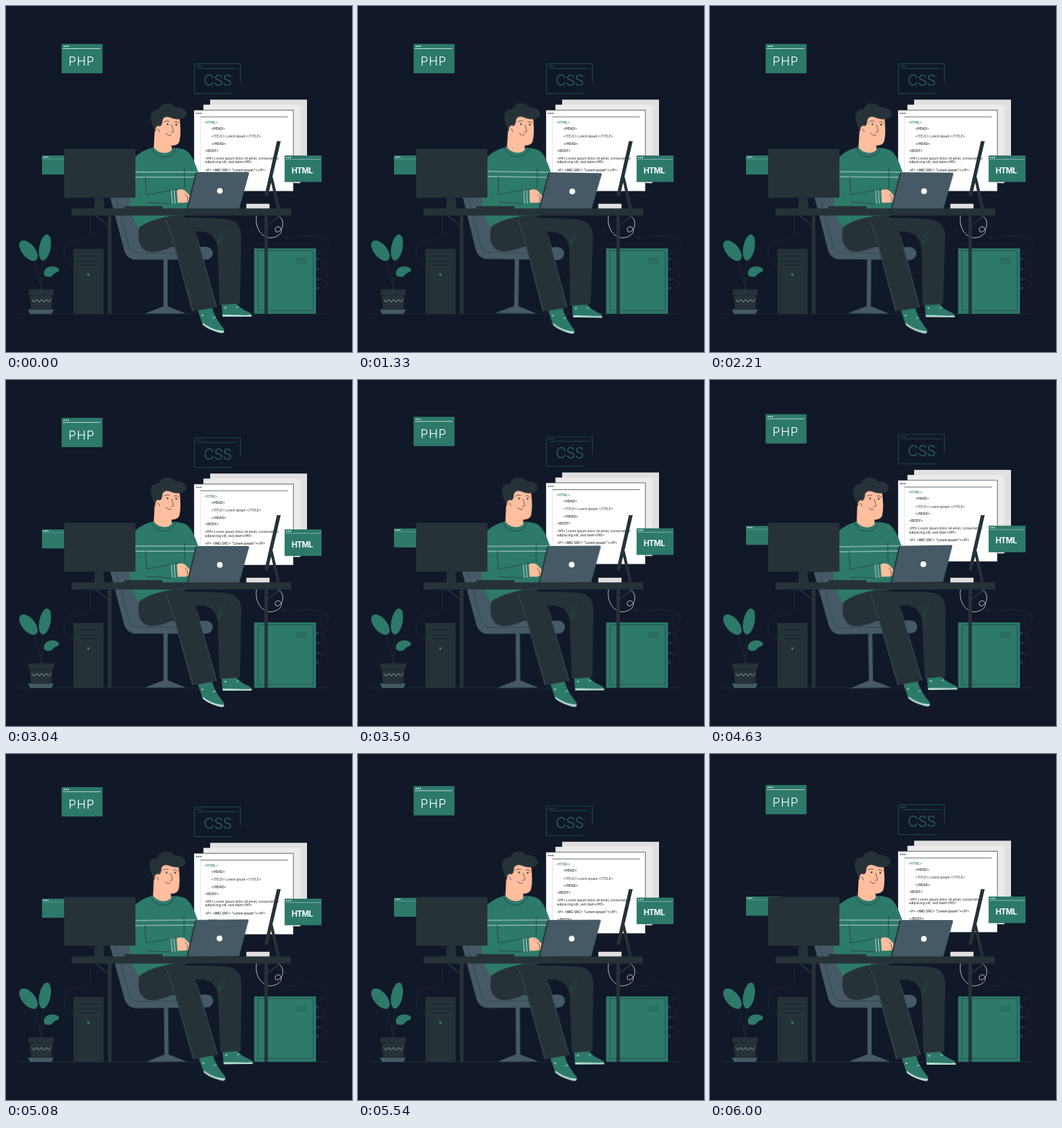
An HTML page for the animation above (6040 ms loop, 500 by 500 pixels).

```html
<!DOCTYPE html>
<html lang="en">
<head>
<meta charset="utf-8">
<title>Developer at a desk</title>
<style>
  :root { --bg: #111827; --dark: #263238; --slate: #455a64; --green: #2d796a; --skin: #ffbe9d; }
  html, body { margin: 0; width: 100%; height: 100%; overflow: hidden; background: var(--bg); }
  svg { display: block; width: 100vw; height: 100vh; }

  /* Six-second cycles cut at 6.04 s; the float waits three seconds first. */
  .sway { transform-origin: 253.5px 306.5px; animation: sway 6040ms linear infinite; }
  .float { animation: float 6040ms linear infinite; }
  @keyframes sway {
    0% { transform: rotate(0deg); }
    24.83% { transform: rotate(1deg); }
    74.5% { transform: rotate(-1deg); }
    99.34% { transform: rotate(0deg); }
    100% { transform: rotate(.027deg); }
  }
  @keyframes float {
    0%, 49.67% { transform: translateY(0); }
    99.34% { transform: translateY(-10px); }
    100% { transform: translateY(-9.87px); }
  }

  .dark { fill: var(--dark); }
  .slate { fill: var(--slate); }
  .green { fill: var(--green); }
  .skin { fill: var(--skin); }
  .white { fill: #fff; }
  .mint { fill: #b4dacf; }
  .line { fill: none; stroke-width: .7; stroke-linecap: round; stroke-linejoin: round; }
  .ink { stroke: var(--dark); }
  .edge { stroke: var(--slate); }
  .pale { stroke: #fff; }
  .deep { stroke: var(--bg); }
  .teal { stroke: var(--green); }
  text { font-family: Inter, "Open Sans", sans-serif; }
  .code { font-size: 4.75px; fill: #1a2226; }
  .code .tag { font-weight: 500; }
</style>
</head>
<body>
<svg viewBox="0 0 500 500">
  <defs>
    <g id="dots"><circle r=".9"/><circle cx="2.9" r=".9"/><circle cx="5.8" r=".9"/></g>
    <pattern id="vent" width="3" height="3" patternUnits="userSpaceOnUse">
      <circle cx="1" cy="1" r=".5" class="dark"/><circle cx="2.5" cy="2.5" r=".5" class="dark"/>
    </pattern>
  </defs>

  <path class="line ink" d="M18 445H465"/>

  <!-- floating windows -->
  <g class="float">
    <rect class="green" x="80.3" y="54.8" width="59.2" height="42.4"/>
    <use href="#dots" x="84.2" y="58.2" class="white"/>
    <path class="line pale" d="M82.5 61.5H136"/>
    <text x="90.2" y="86" font-size="17.8" font-weight="300" letter-spacing=".9" class="white">PHP</text>

    <g opacity=".8">
      <path class="line teal" d="M338.5 110V83.5H272.3V126.5H326M277 90.4H334"/>
      <use href="#dots" x="276" y="87" class="green"/>
      <text x="285.4" y="115" font-size="21.3" font-weight="300" letter-spacing="-.5" class="green">CSS</text>
    </g>

    <rect x="295" y="135.3" width="140" height="117.7" fill="#e0e0e0"/>
    <rect x="285.3" y="142.6" width="140" height="113.4" fill="#ebebeb"/>
    <rect class="white" x="271.6" y="150.4" width="143.6" height="117.4" stroke="#263238" stroke-width=".7"/>
    <use href="#dots" x="275.8" y="155.2" class="dark"/>
    <path class="line ink" d="M281 160.2H407"/>
    <path class="line" stroke="#d2d5d7" d="M281 163V262"/>
    <g class="code">
      <text x="286.5" y="169.7" class="tag" style="fill:var(--green)">&lt;HTML&gt;</text>
      <text x="296.8" y="178.8" class="tag">&lt;HEAD&gt;</text>
      <text x="296.8" y="190.1">&lt;TITLE&gt; Lorem ipsum &lt;/TITLE&gt;</text>
      <text x="296.8" y="200.8" class="tag">&lt;/HEAD&gt;</text>
      <text x="287.8" y="210.6" class="tag">&lt;BODY&gt;</text>
      <text x="287.8" y="221.5"><tspan class="tag">&lt;H1&gt;</tspan> Lorem ipsum dolor sit amet, consectetuer</text>
      <text x="287.8" y="227.4">adipiscing elit, sed diam<tspan class="tag">&lt;/H1&gt;</tspan></text>
      <text x="287.8" y="238.6" class="tag">&lt;P&gt; &lt;IMG SRC= "Lorem ipsum"&gt;&lt;/P&gt;</text>
      <text x="287.8" y="249.6" class="tag">&lt;/BODY&gt;</text>
    </g>

    <rect class="green" x="402.6" y="216" width="53.4" height="38.4"/>
    <use href="#dots" x="405.5" y="218.8" class="white"/>
    <path class="line pale" d="M404.5 221.6H454" opacity=".6"/>
    <text x="412.7" y="241.8" font-size="11.2" font-weight="700" letter-spacing="-.45" class="white">HTML</text>

    <rect class="green" x="52" y="216" width="50" height="27.6"/>
    <use href="#dots" x="54.6" y="218.3" class="white"/>
    <path class="line pale" d="M54 221H100" opacity=".3"/>
  </g>

  <!-- plant -->
  <path class="line ink" d="M51 410C47 392 45 372 34 354M51 410C50 390 53 370 57 347M51 408C51 397 55 389 66 383"/>
  <ellipse class="green" rx="8.3" ry="19" transform="translate(56.3 349) rotate(11)"/>
  <ellipse class="green" rx="9.5" ry="17.5" transform="translate(32.5 353.5) rotate(-40)"/>
  <path class="green" d="M54.500 387C55 378 63 375 70 376.500C78 378 78.500 384 73 385C68 386 68 392 61 391.500Q55 391 54.500 387Z"/>
  <path class="slate" d="M31.5 438.500H69L66 445H35Z"/>
  <path class="dark" d="M32.600 409.600H69V417.300H67.400L65.600 439H36.200L34.400 417.300H32.600Z"/>
  <path class="line deep" opacity=".6" d="M34.500 417.500H67"/>
  <path class="line pale" opacity=".7" d="M37.500 424L40.500 428L44 424L47.500 428L51 424L54.500 428L58 424L61.500 428L65 424"/>

  <!-- computer tower -->
  <path class="line ink" d="M122 303V325C122 342 106 335 94 340C80 346 80 371 97 375"/>
  <rect class="dark" x="97.500" y="351" width="43.500" height="94"/>
  <g class="line deep">
    <path d="M102 445V355.500H137V445" opacity=".45"/>
    <path d="M104 361.300H133M104 368.500H133M107 374.300H131"/>
  </g>
  <circle class="green" cx="119" cy="388" r="2.100"/>

  <!-- cabinet and cables -->
  <g class="line ink">
    <path d="M398 329C406 343 420 329 436 332C456 332 470 339 465 348C460 358 447 353 449 366"/>
    <path d="M452 366C465 366 461 378 452 380C468 382 468 394 452 395C470 396 469 409 452 408"/>
  </g>
  <path class="dark" d="M447 364h5v4h-5zM447 378h5v4h-5zM447 393h5v4h-5zM447 406h5v4h-5z"/>
  <rect class="green" x="358.600" y="350.300" width="89.400" height="94.500"/>
  <path class="line ink" d="M364 354V440H444V354Z" opacity=".8"/>
  <rect x="419" y="364" width="15" height="9" fill="url(#vent)"/>
  <path class="line pale" d="M362 303C359 322 371 336 384 335C396 333 401 325 396 320C392 317 387 321 390 326C395 329 403 319 399 309Q397 305 393 303"/>

  <!-- man, chair and laptop -->
  <g class="sway">
    <path class="slate" d="M227.600 364H233.600V434L260 444.500H200.500L227.600 434Z"/>
    <path class="slate" d="M150.500 276H180L199 340Q202 348 210 348H289.500A9.200 9.200 0 0 1 289.500 366.500H187Q175 366 171 354Z"/>
    <path class="line ink" opacity=".7" d="M159 278L178 348Q181 357 191 357H275"/>

    <!-- far leg and shoe -->
    <path class="green" d="M311.500 431L333 429C336 436 346 440 352 443Q356 446 355 449H313Z"/>
    <path class="mint" d="M313 446C327 446 342 447 355 446.500V449H313Z"/>
    <path class="line pale" d="M333 436L336 434.500"/>
    <circle class="mint" cx="317" cy="436" r="1.200"/>
    <path class="dark" d="M240 306C270 306 300 306 318 308C333 309 340 318 340 333L338 430L308.500 432L306 351C305 337 298 328 284 326L262 326Z"/>
    <path class="line edge" d="M307 341C308 335 312 329 317 325M307 345L315 334"/>

    <!-- near leg and shoe -->
    <path class="green" d="M277 439L298 436C301 449 309 459 314.500 466Q317 471 312 472.500C301 471 291 465 284 460Z"/>
    <path class="mint" d="M284 457.500C292 464 303 469 315 469.500Q316 472 312 472.700C301 471 291 466 284.600 461Z"/>
    <path class="line pale" d="M299 451L302.500 449.500"/>
    <circle class="mint" cx="284" cy="447" r="1.200"/>
    <path class="dark" d="M193 318C188 340 194 356 213 355.500Q229 354 243 346L268.500 441.500L305 435L276 334C269 309 262 303 246 301L210 302Z"/>
    <path class="line edge" d="M231 309C236 320 240 334 244 348L270 440M276 334L304 434"/>

    <!-- torso -->
    <path class="skin" d="M215 178L213.500 206Q226 222 240 209L238 192Z"/>
    <path class="green" d="M213.500 204C201 208 190 212 183 223C175 250 178 290 184 307L191.500 321C203 311 220 307 240 303H262L280 246C274 230 270 216 261 209Q253 205 241 205C238 215 220 215 213.500 204Z"/>
    <path class="line ink" d="M210.500 206C216 222 241 223 245 205.500"/>
    <path class="line pale" d="M187 240H276.500M187 247.300H279"/>
    <path class="line ink" d="M201.500 247L203 273L247 265M258 235V263M204 284L238 286"/>
    <path class="line pale" d="M239 266.500L240.500 285.500M243 266L244.500 285"/>

    <!-- hand -->
    <path class="skin" d="M247 266.500C253 264 257 265 260 268L265.500 274Q267 278 264 283C258 285 253 284 248 284.500Z"/>
    <path class="line ink" d="M259 272L262.500 276L262 282"/>

    <!-- head -->
    <path class="skin" d="M216 170L224 156H250C252.500 172 253 187 250.500 196C248 202 240 203 234 200C226 198 219 192 215 182Z"/>
    <path class="dark" d="M215 181C212 172 207 163 210 155Q213 149 221 149.500C222 143 229 140 236 141Q242 142 245 146.500C253 145 263 151 260.500 158C257 165 246 165 237 161C231 159 227 161 226 166C226 171 224 174 221 174Q222 180 219 182Z"/>
    <path class="skin" d="M224 178C223 171 216 172 216 179C216 185 220 188 224 186Z"/>
    <path class="line ink" d="M218.500 178Q221 177 221.500 182"/>
    <path class="line ink" d="M228.500 167.500Q232 165 236 166.500M243.500 167.500Q247 166 249.500 169M239.500 172L242 181.500Q241 183 238.500 182.500M231.500 184Q233 188 238.500 186.500"/>
    <circle class="dark" cx="233.500" cy="171" r="1.200"/>
    <circle class="dark" cx="246" cy="171.500" r="1.200"/>

    <!-- laptop -->
    <path class="dark" d="M274 240.500H350L335 293H261Z"/>
    <path class="slate" d="M277.500 240H349.500Q351.700 240 351.200 242L337 293H263L275.600 241.600Q276 240 277.500 240Z"/>
    <circle class="white" cx="309" cy="267.200" r="4.100"/>
  </g>

  <!-- desk -->
  <path class="dark" d="M94.800 292.500H412V302.700H94.800ZM147.200 302H152.400V445H147.200ZM373.500 302H378.300V445H373.500Z"/>
  <path class="line ink" style="stroke-width:2" d="M129 302L148 317.500M397 302L377 317.500"/>
  <path class="dark" d="M171 290.500Q171 289.300 173 289.300H224Q226 289.300 226 290.500V293H171Z"/>

  <!-- left monitor -->
  <path class="dark" d="M128.500 276H141L142 293H127.500Z"/>
  <rect class="dark" x="84" y="206.500" width="103" height="70.500" rx="1"/>
  <path class="line deep" opacity=".5" d="M128.500 277.300H141"/>

  <!-- right monitor and box -->
  <path class="dark" d="M391.500 195.300H397L378.500 275H373.500ZM382 250L385.500 247L396 292.500H391.500Z"/>
  <rect x="347.300" y="285.800" width="33.500" height="6.700" fill="#e0e0e0"/>
</svg>
</body>
</html>
```
